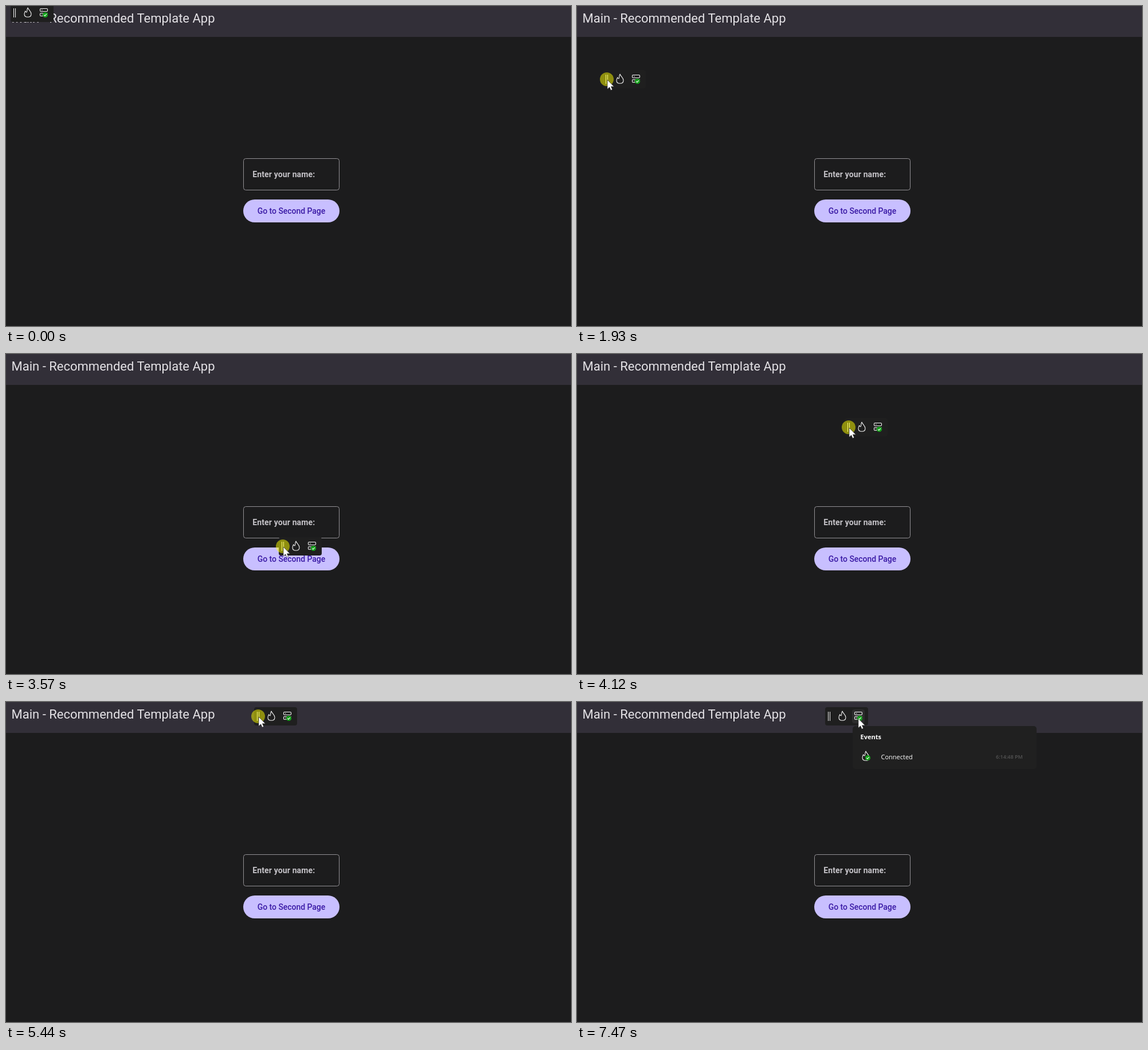
Write an HTML page that moves like this. It is 986 px wide and 559 px high and loops after 8000 ms.

```html
<!DOCTYPE html>
<html lang="en">
<head>
<meta charset="utf-8">
<title>Draggable toolbar</title>
<style>
  html, body { margin: 0; width: 100%; height: 100%; overflow: hidden; background: #1c1c1d; }
  svg { display: block; width: 100%; height: 100%; }
  .app { font-family: Roboto, sans-serif; }
  .panel { font-family: "Open Sans", sans-serif; font-size: 11px; fill: #fff; }
  .line { fill: none; stroke: #f4f4f4; stroke-width: 1.1; stroke-linejoin: round; }
</style>
</head>
<body>
<svg viewBox="0 0 986 559">
  <defs>
    <path id="flame" class="line" d="M0-8C1-4 6-2 6 3C6 6.5 3.5 8.3 0 8.3C-3.5 8.3-6 6.3-6 3C-6 .5-4.8-1.2-4.2-2.2C-3.5-.5-2.8 0-2 0C-.5-.5-2.2-5 0-8Z"/>
    <g id="check">
      <circle r="4.6" fill="#16a01c"/>
      <path d="M-2.2.1L-.6 1.7L2.3-1.5" fill="none" stroke="#fff" stroke-width="1.1"/>
    </g>
  </defs>

  <g class="app">
    <rect width="986" height="559" fill="#1c1c1d"/>
    <rect width="986" height="54" fill="#322f38"/>
    <text x="9.6" y="29" font-size="22" fill="#e3e1e5">Main - Recommended Template App</text>
    <rect x="414.5" y="266.5" width="167" height="55" rx="4" fill="none" stroke="#929094"/>
    <text x="430.2" y="299" font-size="14" font-weight="700" letter-spacing=".14" fill="#c5c3c8">Enter your name:</text>
    <rect x="414" y="338" width="168" height="40" rx="20" fill="#c8bfff"/>
    <text x="498" y="363" font-size="14" font-weight="500" letter-spacing="-.05" text-anchor="middle" fill="#3919a5">Go to Second Page</text>
  </g>

  <g id="bar">
    <rect x="-7" y="-16" width="75" height="32" rx="4" fill="#1f1f1f"/>
    <rect id="hover" x="40" y="-12" width="22" height="24" rx="4" fill="#2d2d2d"/>
    <path d="M-1.5-8V8M1.5-8V8" stroke="#f4f4f4"/>
    <use href="#flame" x="23" y="-1"/>
    <g class="line">
      <rect x="44.5" y="-7.5" width="13" height="5" rx="1.5"/>
      <path d="M57.5 .5H46Q44.5 .5 44.5 2V4Q44.5 5.5 46 5.5H50M47-5H48.5M47 3H48.5"/>
    </g>
    <use href="#check" x="53.5" y="3.5"/>
  </g>

  <g id="popup" class="panel">
    <rect x="481" y="42" width="321" height="75" rx="5" fill="#202020"/>
    <text x="494.5" y="65" font-weight="700">Events</text>
    <use href="#flame" x="504" y="94"/>
    <use href="#check" x="507.5" y="97.5"/>
    <text x="530.5" y="100">Connected</text>
    <text x="731" y="99" font-size="9" font-weight="600" fill="#545454">6:14:48 PM</text>
  </g>

  <circle id="press" r="12" fill="#ff0" fill-opacity=".5"/>
  <path id="cursor" d="M1 1V17.3L4.7 13.8L7.1 19.2L9.7 18L7.4 12.8H12.5Z" fill="#fff" stroke="#222" stroke-width=".6"/>
</svg>

<script>
const LOOP = 8000, FIRST = 1138, TICK = 78;

// Moments, in ticks after the pointer first appears
const ARRIVED = 4, GRAB = 6, RELEASE = 69, LEAVE = 70, HOVER = 72, OPEN = 79;

// Key points of the drag: tick, x, y
const drag = [
  [GRAB, 15, 12], [10, 52, 128], [16, 126, 342], [22, 401, 385], [27, 464, 372],
  [31, 483, 336], [38, 474, 128], [46, 453, 24], [51, 440, 24]
];

// Small vertical shakes before the release: tick, distance
const shakes = [[49, 9], [54, -13], [60, 13], [64, -8]];
const SHAKE_SPEED = 8;

const el = id => document.getElementById(id);
const [bar, hover, popup, press, cursor] = ["bar", "hover", "popup", "press", "cursor"].map(el);
const show = (node, on) => node.setAttribute("visibility", on ? "visible" : "hidden");
const move = (node, [x, y]) => node.setAttribute("transform", `translate(${Math.round(x)} ${Math.round(y)})`);
const clamp = (v, lo, hi) => Math.min(hi, Math.max(lo, v));
const progress = (k, from, to) => clamp((k - from) / (to - from), 0, 1);
const mix = (a, b, u) => a.map((v, i) => v + (b[i] - v) * u);

// Smooth curve through the key points that never overshoots them
function curve(k, axis) {
  const last = drag.length - 1;
  const slope = i => (drag[i + 1][axis] - drag[i][axis]) / (drag[i + 1][0] - drag[i][0]);
  const tangent = i => {
    if (i === 0 || i === last) return 0;
    const a = slope(i - 1), b = slope(i);
    return a * b > 0 ? 2 * a * b / (a + b) : 0;
  };
  let i = 0;
  while (i < last - 1 && drag[i + 1][0] <= k) i++;
  const from = drag[i], to = drag[i + 1], span = to[0] - from[0];
  const u = progress(k, from[0], to[0]), v = 1 - u;
  return from[axis] * v * v * (1 + 2 * u) + to[axis] * u * u * (1 + 2 * v)
    + span * u * v * (tangent(i) * v - tangent(i + 1) * u);
}

function shakeAt(k) {
  return shakes.reduce((sum, [at, dist]) =>
    sum + Math.sign(dist) * clamp((k - at) * SHAKE_SPEED, 0, Math.abs(dist)), 0);
}

const barAt = k => [curve(k, 1), curve(k, 2) + shakeAt(k)];

function pointerAt(k) {
  if (k < GRAB) return mix([-7, 9], barAt(GRAB), progress(k, 0, ARRIVED));
  return mix(barAt(k), [490, 28], progress(k, LEAVE, HOVER));
}

function draw(t) {
  const k = Math.floor((t - FIRST) / TICK);
  const pos = pointerAt(k);
  move(bar, barAt(k));
  move(press, pos);
  move(cursor, pos);
  show(cursor, k >= 0);
  show(press, k >= GRAB && k < RELEASE);
  show(hover, k >= HOVER);
  show(popup, k >= OPEN);
  popup.setAttribute("opacity", progress(k, OPEN - 1, OPEN + 2));
}

const start = performance.now();
function frame() {
  draw((performance.now() - start) % LOOP);
  requestAnimationFrame(frame);
}
frame();
</script>
</body>
</html>
```
